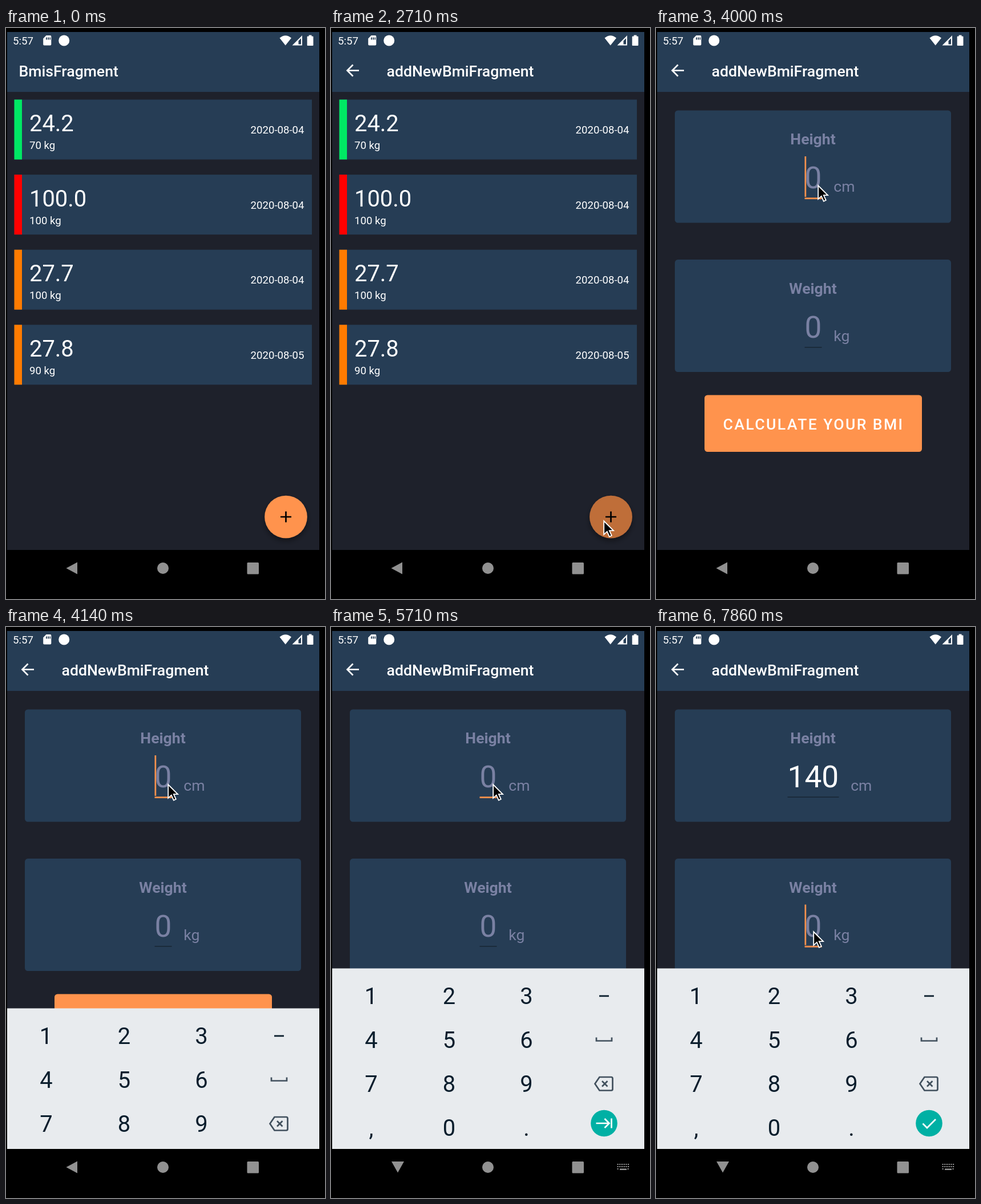
Animation of 559x1001 px, one loop 8000 ms. Source, as an HTML page:

```html
<!DOCTYPE html>
<html lang="en">
<head>
<meta charset="utf-8">
<title>BMI tracker</title>
<style>
  html, body { margin: 0; width: 100%; height: 100%; overflow: hidden; background: #000; }
  svg { display: block; width: 559px; height: 1001px; font-family: Roboto, sans-serif; fill: #fff; }

  .bar, .card { fill: #263d55; }
  .body { fill: #1e212b; }
  .title { font-size: 26.6px; font-weight: 500; }
  .small { font-size: 18.6px; }
  .bmi { font-size: 39.9px; }
  .end { text-anchor: end; }
  .mid, .keys { text-anchor: middle; }
  .label { font-size: 26.6px; font-weight: 700; text-anchor: middle; }
  .unit { font-size: 26.6px; }
  .value { font-size: 53.2px; text-anchor: middle; }
  .muted { fill: #7a81a3; }
  .accent { fill: #ff934d; }
  .idle { fill: #172431; }
  .button { font-size: 26.6px; font-weight: 500; letter-spacing: .0892em; }
  .keys { font-size: 39.9px; fill: #0b1e2d; }
  .nav { fill: #919191; }
  .line { fill: none; stroke: #fff; stroke-width: 2.7; }
  .icon { fill: none; stroke: #41505d; stroke-width: 2.7; }

  /* Hard cuts: every part runs on the same 8 s clock. */
  .t { animation: 8s step-end infinite; }
  .home { animation-name: home; }
  .add { animation-name: add; }
  .press { animation-name: press; }
  .form { animation-name: form; }
  .focus { animation-name: focus; }
  .blink { animation-name: blink; }
  .n0 { animation-name: n0; }
  .n1 { animation-name: n1; }
  .n2 { animation-name: n2; }
  .n3 { animation-name: n3; }
  .rest { animation-name: rest; }
  .next { animation-name: next; }
  .before { animation-name: before; }
  .pad { animation-name: pad; }
  .scroll { animation-name: scroll; }
  .padNav { animation-name: padNav; }
  .backNav { animation-name: backNav; }
  .cursor { animation-name: cursor; }

  @keyframes home { 0% { opacity: 1 } 33.875%, 100% { opacity: 0 } }
  @keyframes add { 0% { opacity: 0 } 33.875%, 100% { opacity: 1 } }
  @keyframes press { 0% { opacity: 0 } 32.125% { opacity: .12 } 33.875%, 100% { opacity: .25 } }
  @keyframes form { 0% { opacity: 0 } 35.75%, 100% { opacity: 1 } }
  @keyframes focus { 0% { opacity: 0 } 50%, 100% { opacity: 1 } }
  @keyframes blink {
    0% { opacity: 0 } 50% { opacity: 1 } 57.125% { opacity: 0 }
    62.5% { opacity: 1 } 69.625% { opacity: 0 } 75%, 100% { opacity: 1 }
  }
  @keyframes n0 { 0% { opacity: 1 } 76.75%, 100% { opacity: 0 } }
  @keyframes n1 { 0% { opacity: 0 } 76.75% { opacity: 1 } 80.375%, 100% { opacity: 0 } }
  @keyframes n2 { 0% { opacity: 0 } 80.375% { opacity: 1 } 83.875%, 100% { opacity: 0 } }
  @keyframes n3 { 0% { opacity: 0 } 83.875%, 100% { opacity: 1 } }
  @keyframes rest { 0% { opacity: 1 } 91.125%, 100% { opacity: 0 } }
  @keyframes next { 0% { opacity: 0 } 96.375%, 100% { opacity: 1 } }
  @keyframes before { 0% { opacity: 1 } 96.375%, 100% { opacity: 0 } }
  @keyframes pad {
    0% { opacity: 0; transform: translateY(130px) }
    51.75% { opacity: 1; transform: translateY(70px) }
    53.625%, 100% { opacity: 1; transform: none }
  }
  @keyframes scroll {
    0% { opacity: 0 } 53.625% { opacity: 1 } 57.125% { opacity: .5 } 58.875%, 100% { opacity: 0 }
  }
  @keyframes padNav { 0% { opacity: 0 } 53.625%, 100% { opacity: 1 } }
  @keyframes backNav { 0% { opacity: 1 } 53.625%, 100% { opacity: 0 } }
  @keyframes cursor {
    0% { opacity: 0; transform: translate(494px, 965px) }
    19.625% { opacity: 1; transform: translate(494px, 965px) }
    21.375% { opacity: 1; transform: translate(481px, 881px); animation-timing-function: steps(4) }
    28.625% { opacity: 1; transform: translate(477px, 862px) }
    35.75% { opacity: 1; transform: translate(477px, 862px); animation-timing-function: steps(3) }
    41.125% { opacity: 1; transform: translate(402px, 673px) }
    44.625% { opacity: 1; transform: translate(330px, 415px) }
    46.375% { opacity: 1; transform: translate(283px, 274px) }
    87.5% { opacity: 1; transform: translate(283px, 274px); animation-timing-function: steps(3) }
    92.875%, 100% { opacity: 1; transform: translate(275px, 532px) }
  }
</style>
</head>
<body>
<svg viewBox="0 0 559 1001">
  <defs>
    <filter id="shadow" x="-30%" y="-30%" width="160%" height="170%">
      <feDropShadow dx="0" dy="5" stdDeviation="5" flood-opacity=".4"/>
    </filter>
  </defs>

  <rect width="559" height="1001" fill="#000"/>
  <rect class="body" x="2" y="7" width="547" height="908"/>

  <!-- List -->
  <g>
    <g>
      <rect class="card" x="14.5" y="125.5" width="521.5" height="105"/>
      <rect x="14.5" y="125.5" width="13.5" height="105" fill="#00e864"/>
      <text class="bmi" x="41" y="181">24.2</text>
      <text class="small" x="41" y="212">70 kg</text>
      <text class="small end" x="522.5" y="185">2020-08-04</text>
    </g>
    <g transform="translate(0 131.6)">
      <rect class="card" x="14.5" y="125.5" width="521.5" height="105"/>
      <rect x="14.5" y="125.5" width="13.5" height="105" fill="#f00"/>
      <text class="bmi" x="41" y="181">100.0</text>
      <text class="small" x="41" y="212">100 kg</text>
      <text class="small end" x="522.5" y="185">2020-08-04</text>
    </g>
    <g transform="translate(0 263.2)">
      <rect class="card" x="14.5" y="125.5" width="521.5" height="105"/>
      <rect x="14.5" y="125.5" width="13.5" height="105" fill="#ff7b00"/>
      <text class="bmi" x="41" y="181">27.7</text>
      <text class="small" x="41" y="212">100 kg</text>
      <text class="small end" x="522.5" y="185">2020-08-04</text>
    </g>
    <g transform="translate(0 394.8)">
      <rect class="card" x="14.5" y="125.5" width="521.5" height="105"/>
      <rect x="14.5" y="125.5" width="13.5" height="105" fill="#ff7b00"/>
      <text class="bmi" x="41" y="181">27.8</text>
      <text class="small" x="41" y="212">90 kg</text>
      <text class="small end" x="522.5" y="185">2020-08-05</text>
    </g>
    <circle class="accent" cx="490.5" cy="857" r="37.3" filter="url(#shadow)"/>
    <circle class="t press" cx="490.5" cy="857" r="37.3" fill="#000"/>
    <path d="M481 857h19M490.5 847.5v19" stroke="#000" stroke-width="2.7"/>
  </g>

  <!-- Form -->
  <g class="t form">
    <rect class="body" x="2" y="112" width="547" height="803"/>
    <rect class="card" x="33" y="144.5" width="484" height="197" rx="5.3"/>
    <text class="label muted" x="275" y="204">Height</text>

    <g class="t n0">
      <text class="value muted" x="275.4" y="281">0</text>
      <text class="unit muted" x="311.3" y="287">cm</text>
      <rect class="idle" x="260.5" y="297.5" width="30" height="1.4"/>
      <g class="accent t focus"><rect x="260.5" y="297.3" width="30" height="2.8"/></g>
      <g class="accent t blink"><rect x="260.5" y="225" width="2.7" height="71"/></g>
    </g>
    <g class="t n1">
      <text class="value" x="275.4" y="281">1</text>
      <text class="unit muted" x="311.3" y="287">cm</text>
      <path class="accent" d="M260.5 297.3h30v2.8h-30zM288 225h2.7v71h-2.7z"/>
    </g>
    <g class="t n2">
      <text class="value" x="275.4" y="281">14</text>
      <text class="unit muted" x="326.3" y="287">cm</text>
      <path class="accent" d="M245.5 297.3h60v2.8h-60zM303 225h2.7v71H303z"/>
    </g>
    <g class="t n3">
      <text class="value" x="275.4" y="281">140</text>
      <text class="unit muted" x="341.2" y="287">cm</text>
      <rect class="idle" x="230.5" y="297.5" width="90" height="1.4"/>
      <g class="accent t before"><rect x="230.5" y="297.3" width="90" height="2.8"/></g>
      <g class="accent t rest"><rect x="318" y="225" width="2.7" height="71"/></g>
    </g>

    <g transform="translate(0 261.6)">
      <rect class="card" x="33" y="144.5" width="484" height="197" rx="5.3"/>
      <text class="label muted" x="275" y="204">Weight</text>
      <text class="value muted" x="275.4" y="281">0</text>
      <text class="unit muted" x="311.3" y="287">kg</text>
      <rect class="idle" x="260.5" y="297.5" width="30" height="1.4"/>
      <path class="accent t next" d="M260.5 297.3h30v2.8h-30zM260.5 225h2.7v71h-2.7z"/>
    </g>

    <rect class="accent" x="85" y="643.5" width="381" height="99.5" rx="5.3"/>
    <text class="button" x="117.5" y="703.5">CALCULATE YOUR BMI</text>
    <rect class="t scroll" x="544" y="112" width="5" height="371" fill="#30343d"/>
  </g>

  <!-- Number pad -->
  <g class="t pad">
    <rect x="2" y="598.5" width="547" height="317" fill="#e8ebee"/>
    <g class="keys">
      <text x="70" y="661">1</text><text x="207" y="661">2</text><text x="342.5" y="661">3</text>
      <text x="70.5" y="738">4</text><text x="207" y="738">5</text><text x="342.5" y="738">6</text>
      <text x="70.5" y="815">7</text><text x="207" y="815">8</text><text x="342.5" y="815">9</text>
      <text x="70.5" y="892">,</text><text x="207" y="892">0</text><text x="342.5" y="892">.</text>
      <rect x="470" y="645.5" width="17" height="2.8"/>
    </g>
    <path class="icon" d="M465 719.5v6h27v-6"/>
    <path class="icon" d="M470.5 789H491q2.5 0 2.5 2.5v18.500q0 2.500-2.500 2.500h-20.500l-8-11.750zM475 796l9.500 9.500M484.500 796l-9.500 9.500"/>
    <circle cx="478.500" cy="870" r="23.300" fill="#00b0a4"/>
    <path class="line t before" d="M464.500 870H487M479.500 862l8 8-8 8M491.500 861.500v17"/>
    <path class="line t next" d="M467.500 870.500l7.500 7.500 15-15"/>
  </g>

  <!-- Bars -->
  <rect class="bar" x="2" y="7" width="547" height="105"/>
  <text class="small" x="12" y="29">5:57</text>
  <path fill-rule="evenodd" d="M70.500 13H77.500q1.800 0 1.800 1.800V28.700q0 1.800-1.800 1.800H67q-1.800 0-1.800-1.800V18.500zM70 16.500v4h1.800v-4zM73.200 16.500v4H75v-4zM76.300 16.500v4h1.600v-4z"/>
  <circle cx="101.700" cy="22" r="9.500"/>
  <path d="M479.500 17.500Q489.700 9 500 17.500L489.700 30.500z"/>
  <path fill-rule="evenodd" d="M519 13v17.500H501.500zM517 18l-4.500 4.500v6H517z"/>
  <path d="M530.700 12.500h4.800v2h2q1 0 1 1V30q0 1-1 1h-8.800q-1 0-1-1V15.500q0-1 1-1h2z"/>

  <text class="title t home" x="22.500" y="85">BmisFragment</text>
  <g class="t add">
    <path class="line" d="M49 74.500H29M38.500 64.500l-10 10 10 10"/>
    <text class="title" x="97.500" y="85">addNewBmiFragment</text>
  </g>

  <rect x="0" y="915" width="559" height="86" fill="#000"/>
  <g class="nav">
    <path class="t backNav" d="M105.500 947L125 936.500v21z"/>
    <circle cx="275" cy="947" r="10"/>
    <rect x="422.500" y="937" width="20.500" height="20.500" rx="1.500"/>
    <g class="t padNav">
      <path d="M106 937h22l-11 19.500z"/>
      <path d="M501.500 942h21M501.500 946h21M501.500 950h2.500M519.500 950h2.500" stroke="#919191" stroke-width="2.200" stroke-dasharray="2.200 1.500"/>
      <rect x="506" y="949.500" width="12" height="2.500"/>
    </g>
  </g>

  <g class="t cursor">
    <path d="M1.200 2.300V26l5.600-5.300 4 9 4-1.800-4-8.700h7.200z" fill="#000" stroke="#fff" stroke-width="1.800"/>
  </g>
</svg>
</body>
</html>
```
